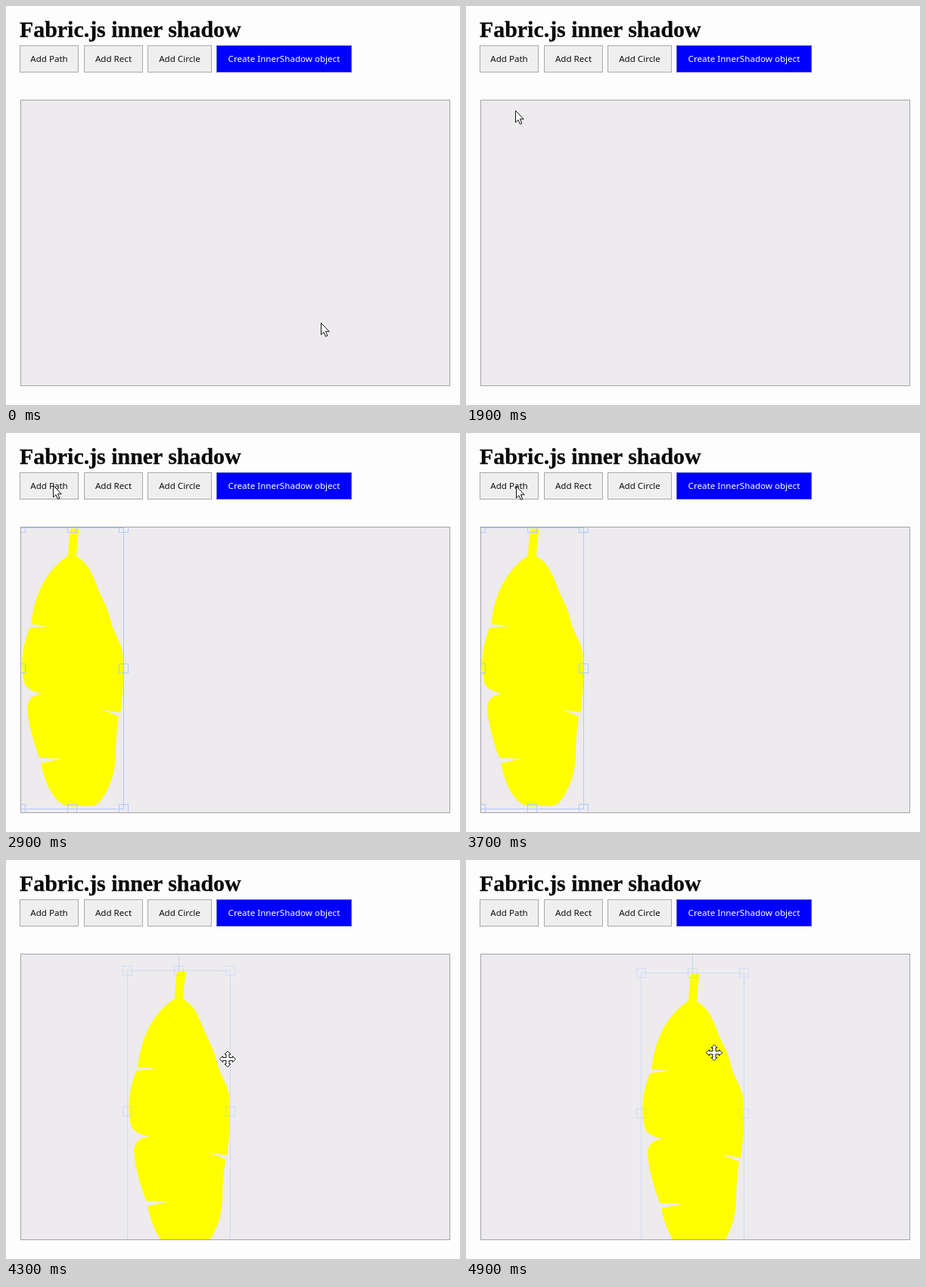
Recreate the animation shown at these times as an HTML page with a canvas. Size 600 by 528 pixels, loop 5000 ms.

```html
<!DOCTYPE html>
<html lang="en">
<head>
<meta charset="utf-8">
<title>Fabric.js inner shadow</title>
<style>
  html, body { margin: 0; width: 600px; height: 528px; overflow: hidden; background: #fdfdfe; }
  h1, .btn, .board, canvas { position: absolute; margin: 0; box-sizing: border-box; }
  h1 {
    left: 18px; top: 14px; white-space: nowrap; color: #0a0a0a; -webkit-text-stroke: .3px;
    font: bold 29.9px/34px "Liberation Serif", "Noto Serif", serif;
  }
  .btn {
    top: 52px; width: 78px; height: 36px; border: 1px solid #a9a9ae; background: #efeff0; color: #111;
    font: 11.6px/33px "Noto Sans", "Open Sans", sans-serif; text-align: center; white-space: nowrap;
  }
  .main { background: #0000fe; color: #fff; border-color: #5c5cdc; }
  .board { left: 19px; top: 124px; width: 568px; height: 379px; background: #edebee; border: 1px solid #a3a3a7; }
  canvas { left: 0; top: 0; }
</style>
</head>
<body>
<h1>Fabric.js inner shadow</h1>
<div class="btn" style="left:18px">Add Path</div>
<div class="btn" style="left:103px">Add Rect</div>
<div class="btn" style="left:187px;width:85px">Add Circle</div>
<div class="btn main" style="left:278px;width:179px">Create InnerShadow object</div>
<div class="board"></div>
<canvas id="stage" width="600" height="528"></canvas>
<script>
const ctx = document.getElementById("stage").getContext("2d");
const LOOP = 5000, STEP = 100, SHOW = 2900, HOVER = 3900, DRAG = 4100;
const REST = { x: 416, y: 419 }, GRAB = { x: 116, y: 241 };

const linear = p => p;
const inOut = p => p * p * (3 - 2 * p);
const out = p => 1 - (1 - p) ** 2.45;

// pointer glides, moved once per step from first to last
const glides = [
  { first: 900, last: 1300, x: 83, y: 69, ease: inOut },
  { first: 1600, last: 1900, x: 65, y: 138, ease: inOut },
  { first: 2000, last: 2100, x: 76, y: 80, ease: linear },
  { first: 2200, last: 2400, x: 62, y: 69, ease: out },
  { first: 3700, last: 3700, x: 66, y: 70, ease: linear },
  { first: 3800, last: 4000, ...GRAB, ease: linear },
  { first: 4100, last: 4100, x: 171, y: 257, ease: linear },
  { first: 4200, last: 4200, x: 257, y: 262, ease: linear },
  { first: 4300, last: 4600, x: 328, y: 265, ease: out },
  { first: 4900, last: 4900, x: 328, y: 255, ease: linear }
];

function pointerAt(t) {
  let { x, y } = REST;
  for (const g of glides) {
    if (t < g.first) break;
    const count = (g.last - g.first) / STEP + 1;
    const done = Math.floor((t - g.first) / STEP) + 1;
    const p = g.ease(Math.min(1, done / count));
    x += (g.x - x) * p;
    y += (g.y - y) * p;
  }
  return { x, y };
}

const leaf = new Path2D(`M85 126.5H97Q94 142 93 163
  C107 171 113 183 120 202S133 226 138 247 153 276 154 292 156 340 151 370
  L127 366 149 375Q145 398 145 430
  C143 455 135 474 124 488 115 497 105 492 92 494S57 490 46 437
  L74 431 44 430Q30 392 28 364 28 347 49 345 33 343 25 333 15 298 31 258
  L58 255 33 253Q40 190 82 162 83 140 85 126.5Z`);
const arrow = new Path2D("M.5 .5V16L4 12.7 6.4 18.3 8.8 17.3 6.4 11.7H11.2Z");

// four-headed arrow: one arm turned around the centre
const cross = new Path2D();
for (let k = 0; k < 4; k++) {
  for (const [x, y] of [[-2, -2], [-2, -6.5], [-4, -6.5], [0, -10.5], [4, -6.5], [2, -6.5]]) {
    const c = Math.round(Math.cos(k * Math.PI / 2)), s = Math.round(Math.sin(k * Math.PI / 2));
    cross.lineTo(x * c - y * s, x * s + y * c);
  }
}
cross.closePath();

function drawSelection(alpha) {
  const left = 19.5, top = 125.5, w = 136, h = 372;
  ctx.globalAlpha = alpha;
  ctx.strokeStyle = "#b0caff";
  ctx.strokeRect(left, top, w, h);
  ctx.strokeRect(left + w / 2, top - 40, 0, 40);
  for (let i = 0; i < 3; i++) {
    for (let j = 0; j < 3; j++) {
      if (i === 1 && j === 1) continue;
      ctx.strokeRect(left + i * w / 2 - 6, top + j * h / 2 - 6, 12, 12);
    }
  }
}

function drawLeaf(dx, dy, alpha) {
  ctx.save();
  ctx.beginPath();
  ctx.rect(20, 125, 566, 377);
  ctx.clip();
  ctx.translate(dx, dy);
  ctx.fillStyle = "#ffff00";
  ctx.fill(leaf);
  drawSelection(alpha);
  ctx.restore();
}

function drawPointer(shape, { x, y }) {
  ctx.save();
  ctx.translate(x, y);
  ctx.fillStyle = "#fff";
  ctx.strokeStyle = "#111";
  ctx.fill(shape);
  ctx.stroke(shape);
  ctx.restore();
}

function draw(t) {
  ctx.clearRect(0, 0, 600, 528);
  if (t >= DRAG) {
    // the dragged leaf trails the pointer by one step
    const held = pointerAt(t - STEP);
    drawLeaf(Math.round(held.x - GRAB.x), Math.round(held.y - GRAB.y), 0.45);
  } else if (t >= SHOW) {
    drawLeaf(0, 0, 1);
  }
  drawPointer(t >= HOVER ? cross : arrow, pointerAt(t));
}

const start = performance.now();
function tick() {
  draw((performance.now() - start) % LOOP);
  requestAnimationFrame(tick);
}
tick();
</script>
</body>
</html>
```
